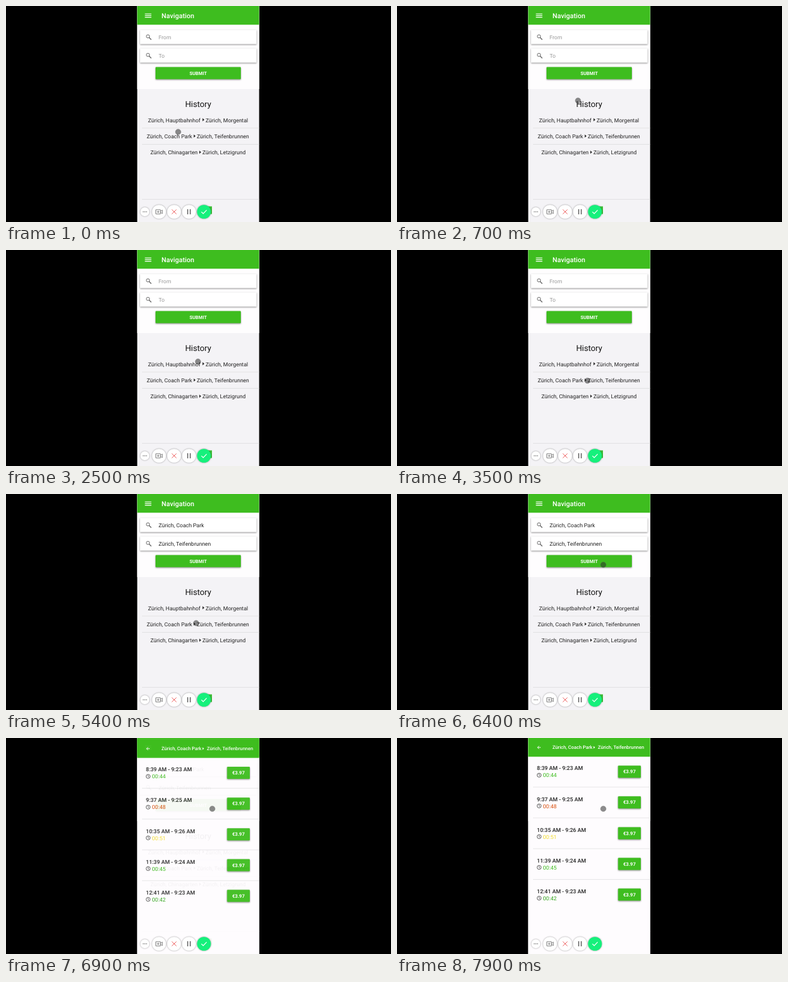
These frames come from a looping animation (600x338 px, 8000 ms). An HTML page:

```html
<!DOCTYPE html>
<html lang="en">
<head>
<meta charset="utf-8">
<title>Navigation</title>
<style>
html, body { margin: 0; height: 100%; overflow: hidden; background: #000; }
svg { display: block; width: 100vw; height: 100vh; font-family: Roboto, sans-serif; text-rendering: geometricPrecision; }
.card { filter: drop-shadow(0 1px .8px rgba(0,0,0,.45)); }
.fab { filter: drop-shadow(0 .8px 1.2px rgba(0,0,0,.4)); }
</style>
</head>
<body>
<svg id="stage" viewBox="0 0 600 338">
  <clipPath id="phone"><rect x="204.5" width="190" height="338"/></clipPath>
  <g clip-path="url(#phone)">
    <g id="search"></g>
    <g id="results"></g>
    <g id="fabs"></g>
    <circle id="dot" r="4.3" fill="#282828" fill-opacity=".53" stroke="#555" stroke-opacity=".45" stroke-width=".7"/>
  </g>
</svg>
<script>
const GREEN = '#3ebd1f', INK = '#222';
const $ = id => document.getElementById(id);

const text = (x, y, str, size = 8.5, color = INK, weight = 400, extra = '') =>
  `<text x="${x}" y="${y}" font-size="${size}" fill="${color}" font-weight="${weight}" ${extra}>${str}</text>`;
const rect = (x, y, w, h, fill, extra = '') =>
  `<rect x="${x}" y="${y}" width="${w}" height="${h}" fill="${fill}" ${extra}/>`;
const path = (d, color, width = 1) =>
  `<path d="${d}" fill="none" stroke="${color}" stroke-width="${width}"/>`;
const arrow = (x, y, color, s = 1) =>
  `<path d="M${x} ${y - 2.5 * s}l${2.8 * s} ${2.5 * s}l${-2.8 * s} ${2.5 * s}z" fill="${color}"/>`;
const rule = y => rect(212, y, 183, .6, '#d6d6d8');
const button = (x, y, w, label, size) =>
  rect(x, y, w, 19, GREEN, 'rx="1" class="card"') +
  text(x + w / 2, y + 12.1, label, size, '#fff', 700, 'text-anchor="middle"');
const header = rect(204, 0, 191, 29.3, GREEN);

// Search page
const field = (y, id, hint) =>
  rect(209, y, 181.5, 22.3, '#fff', 'class="card"') +
  `<circle cx="221.2" cy="${y + 10.2}" r="2.5" fill="none" stroke="#666" stroke-width="1"/>` +
  path(`M223 ${y + 12}l3.4 3.4`, '#666', 1.3) +
  text(237.7, y + 14.7, hint, 8.5, '#999', 400, `id="${id}"`);

const history = [
  [221.3, 'Hauptbahnhof', 306.3, 311, 'Morgental'],
  [219.2, 'Coach Park', 292.6, 297.2, 'Teifenbrunnen'],
  [225, 'Chinagarten', 301.3, 306, 'Letzigrund']
];

$('search').innerHTML =
  rect(204, 0, 191, 338, '#f4f3f6') + rect(204, 0, 191, 130, '#fefdfe') + header +
  path('M216.5 12.2h10M216.5 14.9h10M216.5 17.6h10', '#fff', 1.1) +
  text(242.3, 18.6, 'Navigation', 10.6, '#fff', 500) +
  field(37.3, 'from', 'From') + field(66.3, 'to', 'To') +
  button(233, 95.6, 133, 'SUBMIT', 7.3) +
  text(299.5, 158, 'History', 12.8, '#111', 400, 'text-anchor="middle"') +
  history.map(([x, a, ax, bx, b], i) => {
    const y = 181.6 + i * 25.3;
    return text(x, y, 'Zürich, ' + a) + arrow(ax, y - 3.5, INK) + text(bx, y, 'Zürich, ' + b);
  }).join('') +
  rule(190.7) + rule(216) + rule(302) + rect(309, 313.5, 12, 12, '#3fc03a');

// Results page
const trips = [
  ['8:39 AM - 9:23 AM', '00:44', GREEN],
  ['9:37 AM - 9:25 AM', '00:48', '#d9500f'],
  ['10:35 AM - 9:26 AM', '00:51', '#f3dc2b'],
  ['11:39 AM - 9:24 AM', '00:45', GREEN],
  ['12:41 AM - 9:23 AM', '00:42', '#33a51d']
];

$('results').innerHTML =
  rect(204, 0, 191, 338, '#fefcfe') + header +
  path('M224 14.8h-5M221.4 12.4l-2.4 2.4l2.4 2.4', '#fff', .9) +
  text(242.3, 17.4, 'Zürich, Coach Park', 7.4, '#fff', 500) + arrow(306.3, 14.7, '#fff', .85) +
  text(313, 17.4, 'Zürich, Teifenbrunnen', 7.4, '#fff', 500) +
  trips.map(([span, length, color], i) => {
    const y = i * 48.1;
    return text(218, y + 50.4, span, 8.6, INK, 500) +
      `<circle cx="221.5" cy="${y + 58.2}" r="3.1" fill="none" stroke="#444" stroke-width=".9"/>` +
      path(`M221.5 ${y + 56.3}v2.1l1.5 1`, '#444', .8) +
      text(227.5, y + 61.4, length, 8.6, color) +
      button(344.5, y + 43.2, 35.5, '€3.97', 7.5) +
      (i < 4 ? rule(y + 76.6) : '');
  }).join('');

// Floating recorder controls
const fab = (x, r, fill) => `<circle cx="${x}" cy="322" r="${r}" fill="${fill}" class="fab"/>`;
$('fabs').innerHTML =
  fab(216.4, 7, '#fff') + fab(238.5, 10.8, '#fff') + fab(262, 10.8, '#fff') +
  fab(285.2, 10.8, '#fff') + fab(308.5, 10.8, '#16f07c') +
  [213.9, 216.4, 218.9].map(x => `<circle cx="${x}" cy="322" r=".8" fill="#666"/>`).join('') +
  path('M233.5 318.8h7.2v6.6h-7.2zM240.7 321.3l3-2v5.6l-3-2M235.3 322.1h3.6M237.1 320.3v3.6', '#777', .9) +
  path('M258.4 318.4l7.2 7.2M265.6 318.4l-7.2 7.2', '#ee6a6a') +
  path('M283.2 318v8M287.2 318v8', '#666', 1.5) +
  path('M304.5 322.2l2.8 2.8l5.4 -5.6', '#fff', 1.2);

// Pointer: time, x, y
const route = [
  [0, 268.3, 197], [900, 286, 134], [1500, 291.5, 119], [1600, 291.5, 119],
  [2000, 301, 160], [2100, 301, 160], [3000, 297, 193], [3500, 296.8, 204.5],
  [4900, 296.8, 204.5], [5400, 296.3, 202], [5800, 313, 147], [6200, 322, 110.8],
  [6300, 322, 110.8], [6400, 321.5, 110.8], [8000, 321.5, 110.8]
];

function pointer(t) {
  const i = route.findIndex(p => p[0] > t);
  const [a, b] = [route[i - 1], route[i]];
  const k = (t - a[0]) / (b[0] - a[0]);
  return [a[1] + (b[1] - a[1]) * k, a[2] + (b[2] - a[2]) * k];
}

// cubic-bezier(.36, .66, .04, 1)
function ease(x) {
  if (x <= 0) return 0;
  if (x >= 1) return 1;
  const curve = (s, a, b) => 3 * a * s * (1 - s) ** 2 + 3 * b * s * s * (1 - s) + s ** 3;
  let lo = 0, hi = 1;
  for (let i = 0; i < 20; i++) {
    const mid = (lo + hi) / 2;
    if (curve(mid, .36, .04) < x) lo = mid; else hi = mid;
  }
  return curve(lo, .66, 1);
}

function fill(id, value, hint, filled) {
  $(id).textContent = filled ? value : hint;
  $(id).setAttribute('fill', filled ? INK : '#999');
}

const start = performance.now();
function draw(now) {
  const t = Math.floor(Math.max(0, now - start) % 8000 / 100) * 100;
  const filled = t >= 5000;
  fill('from', 'Zürich, Coach Park', 'From', filled);
  fill('to', 'Zürich, Teifenbrunnen', 'To', filled);
  const k = ease((t - 6750) / 280);
  $('results').setAttribute('opacity', k);
  $('results').setAttribute('transform', `translate(0 ${40 * (1 - k)})`);
  const [x, y] = pointer(t);
  $('dot').setAttribute('cx', x);
  $('dot').setAttribute('cy', y);
  requestAnimationFrame(draw);
}
draw(start);
</script>
</body>
</html>
```
